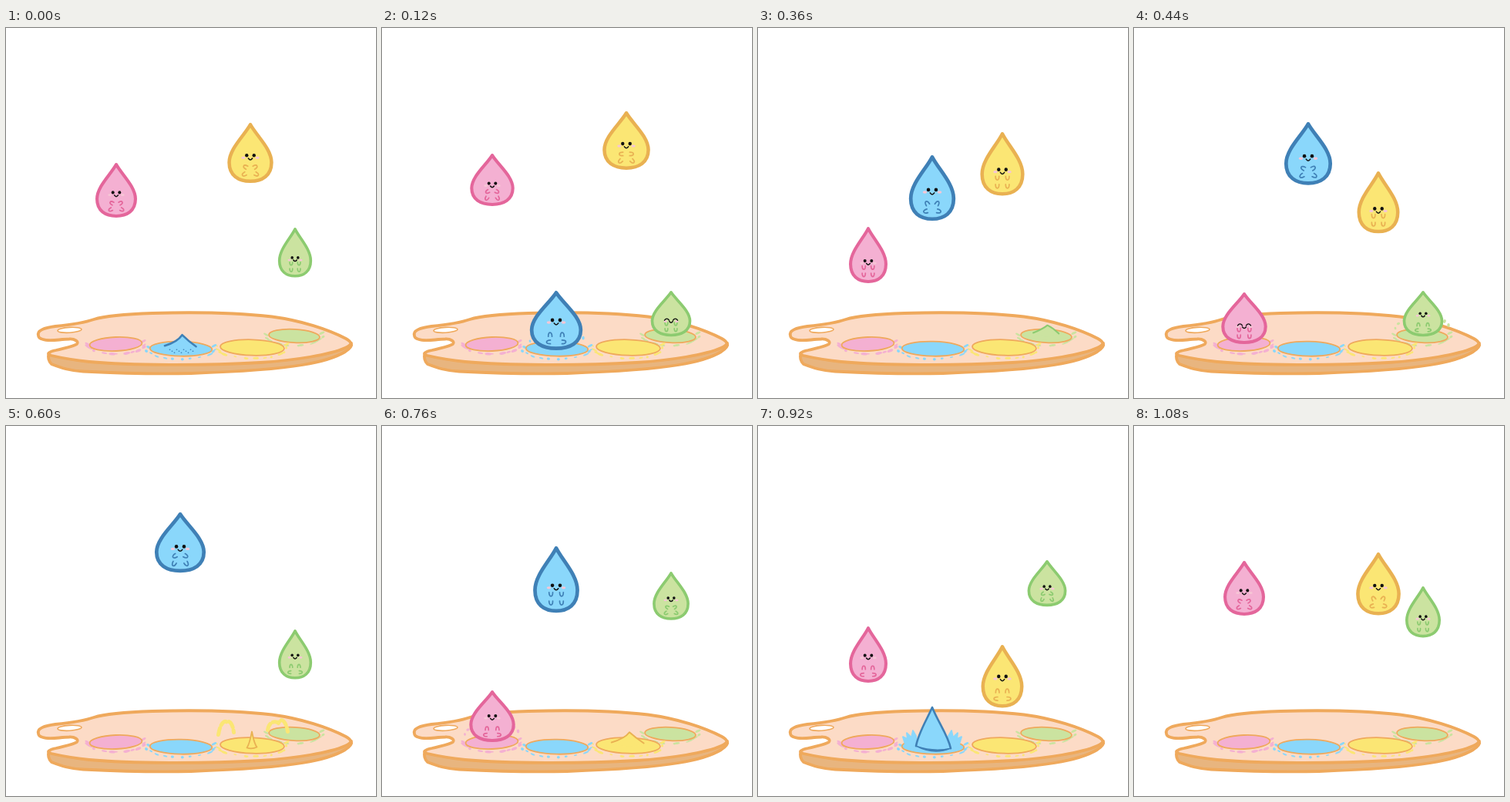
These frames come from a looping animation (480x480 px, 1.12 s). An HTML page with a canvas:

```html
<!DOCTYPE html>
<html lang="en">
<head>
<meta charset="utf-8">
<title>Paint drops</title>
<style>
  html, body { margin: 0; width: 100%; height: 100%; overflow: hidden; background: #fff; }
  canvas { display: block; width: 480px; height: 480px; }
</style>
</head>
<body>
<canvas id="stage" width="480" height="480"></canvas>
<script>
const ctx = document.getElementById('stage').getContext('2d');
const TICK = 40, TICKS = 28;
const EDGE = '#efa95c', TAU = Math.PI * 2;

// Drop size for poses 1 to 11 of the jump, before scaling
const HEIGHT = [67, 74, 73, 74, 71, 69, 68, 70, 75, 73, 67];
const WIDTH = [59.5, 50, 50, 52.5, 54, 56, 57.5, 55, 52, 50, 59.5];

// tips: y of the point in poses 1 to 11; pool: centre, radii, tilt
const drops = [
  { fill: '#cbe3a0', line: '#8ccb70', x: 375, scale: .885, start: 8, spray: 4,
    pool: [374, 399.5, 33, 8.7, .05],
    tips: [341, 305, 264, 222, 189, 177, 174, 183, 208, 259, 341] },
  { fill: '#fbe674', line: '#e9b152', x: 317, scale: 1.1, start: 18, spray: 4, sinks: true,
    pool: [319.5, 414.5, 41.5, 10.2, .03],
    tips: [341, 284, 222, 164, 123, 108, 103, 102, 135, 186, 364] },
  { fill: '#8ad7fb', line: '#3f80b6', x: 226, scale: 1.15, start: 0, spray: 0, sinks: true, dots: true,
    pool: [227, 416.2, 40.3, 9.5, .02],
    tips: [341, 290, 229, 165, 122, 112, 112, 120, 156, 225, 364] },
  { fill: '#f4b0d2', line: '#e4669b', x: 143, scale: 1, start: 17, spray: 0,
    pool: [142.5, 410, 34, 9, -.04],
    tips: [343, 305, 260, 212, 175, 165, 163, 169, 200, 258, 343] }
];

function paint(path, fill, line, width) {
  if (fill) { ctx.fillStyle = fill; ctx.fill(path); }
  if (line) { ctx.strokeStyle = line; ctx.lineWidth = width; ctx.stroke(path); }
}

function oval(x, y, rx, ry, tilt = 0) {
  const p = new Path2D();
  p.ellipse(x, y, rx, ry, tilt, 0, TAU);
  return p;
}

function random(seed) {
  return () => (seed = (seed * 16807) % 2147483647) / 2147483647;
}

const rim = new Path2D(`M55.5 422 C54 428 56 433 59 436 C72 441 82 444.5 100 445.5
  C150 448 200 449 240 448 C300 446 350 443 385 437 C415 432 430 426 440 420 C446 416 449 412 448 409 Z`);
const board = new Path2D(`M42 399 C40 392 50 389 64 387 C84 385 100 383 114 378
  C130 373 160 371 190 370 C240 368.5 300 369.5 345 374.5 C383 379.5 418 391 441 403
  C450 408 449 411 440 415 C420 424 375 431 330 434 C260 438 160 438 108 433
  C90 431 72 428 59 425 C52 423 55 420 65 418 C76 415 88 413 92 410
  C95 407 89 403 82 403.5 C68 404 56 407 48 404 C44 403 42 401 42 399 Z`);

function drawBoard() {
  paint(rim, '#e8b57f', EDGE, 3.8);
  paint(board, '#fcdbc6', EDGE, 3.8);
  paint(oval(82.5, 391.8, 15.5, 3.4, -.06), '#fff', EDGE, 1.6);
}

function drawPool(d, n) {
  const [x, y, rx, ry, tilt] = d.pool;
  const rnd = random(91 + n * 37);
  ctx.fillStyle = d.fill;
  for (let i = 0; i < 13; i++) {
    const a = -.3 + i / 13 * 3.7 + rnd() * .2;
    const far = 1.06 + rnd() * .08;
    ctx.fill(oval(x + Math.cos(a) * rx * far, y + Math.sin(a) * (ry + 2.5) * far,
      1.4 + rnd() * 3.2, .8 + rnd() * 1, -Math.cos(a) * .5));
  }
  paint(oval(x, y, rx, ry, tilt), d.fill, EDGE, 1.8);
}

function teardrop(w, h) {
  const a = w / 2;
  return new Path2D(`M0 0 C${a * .3} ${h * .2} ${a} ${h * .43} ${a} ${h * .67}
    C${a} ${h * .9} ${a * .56} ${h} 0 ${h} C${-a * .56} ${h} ${-a} ${h * .9} ${-a} ${h * .67}
    C${-a} ${h * .43} ${-a * .3} ${h * .2} 0 0 Z`);
}

// A small open curl, used for hands and feet
function curl(x, y, angle, size) {
  ctx.save();
  ctx.translate(x, y);
  ctx.rotate(angle * Math.PI / 180);
  ctx.stroke(new Path2D(`M${-size} ${-size * 1.2} C${-size} ${size * 1.6} ${size} ${size * 1.6} ${size} ${-size * 1.2}`));
  ctx.restore();
}

function drawFace(d, pose, h) {
  const s = d.scale, y = h * (.45 + .0125 * pose), gap = 4.3 * s;
  const asleep = pose === 11;
  for (const side of [-1, 1]) {
    paint(oval(side * 8.3 * s, y + 3, 2.4 * s, 1.5 * s), '#f6c6d6');
    if (asleep) {
      paint(new Path2D(`M${side * 5.5 - 3} ${y + 1.5} q3 -4 6 0`), null, '#111', 1.4);
    } else {
      paint(oval(side * gap, y, 2 * s, 2.1 * s), '#111');
    }
  }
  paint(new Path2D(`M${-2.4 * s} ${y + 3.4 * s} q${2.4 * s} ${3.6 * s} ${4.8 * s} 0`), null, '#111', 1.5);
}

function drawLimbs(d, pose, w, h) {
  const turn = Math.min(1, Math.max(0, (9 - pose) / 6)), lean = .115 * w;
  ctx.strokeStyle = d.line;
  ctx.lineWidth = 1.7;
  for (const side of [-1, 1]) {
    curl(side * lean, h * .7, -side * 180 * turn, 2.1 * d.scale);
    curl(side * (lean + 2.5 * turn), h * .83, -side * 90 * turn, 2.1 * d.scale);
  }
}

function drawDrop(d, pose) {
  const h = HEIGHT[pose - 1] * d.scale, w = WIDTH[pose - 1] * d.scale;
  const line = 4.1 * d.scale;
  ctx.save();
  ctx.translate(d.x, d.tips[pose - 1] + line / 2);
  paint(teardrop(w - line, h - line), d.fill, d.line, line);
  drawLimbs(d, pose, w, h);
  drawFace(d, pose, h);
  ctx.restore();
}

function drawBits(d, bits) {
  const [x, y] = d.pool;
  for (const [dx, dy, r] of bits) paint(oval(x + dx, y + dy, r, r * .75, dx * dy), d.fill);
}

function drawMound(d) {
  const [x, y, rx] = d.pool;
  const a = rx * .56, top = -18 * d.scale / 1.15;
  ctx.save();
  ctx.translate(x + 1.5, y);
  paint(new Path2D(`M${-a} -4 Q-6 -10 0 ${top} Q8 -9 ${a * .8} -3 Q0 6 ${-a} -4 Z`), d.fill);
  paint(new Path2D(`M${-a} -4 Q-6 -9 0 ${top} Q8 -10 ${a * .8} -3`), null, d.line, d.dots ? 2.6 : 2);
  if (d.dots) {
    for (let i = 0; i < 11; i++) {
      paint(oval(-16 + i * 3, 1 + (i % 3) * 2, .9, .7), d.line);
    }
  }
  ctx.restore();
}

function drawSinking(d) {
  const y = d.pool[1], top = d.tips[10] - y + 1;
  ctx.save();
  ctx.translate(d.x, y);
  for (const side of [-1, 1]) {
    const crown = new Path2D(`M${side * 19} 2 L${side * 21} -14 L${side * 25} -21 L${side * 27} -12
      L${side * 33} -18 L${side * 32} -10 L${side * 38} -13 L${side * 34} 0 Z`);
    paint(crown, d.fill, d.fill, 2);
  }
  const sides = `M-21 -1 C-18 -18 -7 ${top + 16} 0 ${top} C8 ${top + 20} 20 -16 24 2`;
  paint(new Path2D(`${sides} Q2 11 -21 -1 Z`), d.fill);
  paint(new Path2D(sides), null, d.line, 2.6);
  paint(new Path2D('M-21 -1 Q2 11 24 2 Q2 7 -21 -1 Z'), d.line, d.line, 1.4);
  ctx.restore();
}

function drawSpike(d) {
  const [x, y] = d.pool, s = d.scale / 1.1;
  ctx.save();
  ctx.translate(x, y);
  ctx.scale(s, s);
  paint(new Path2D('M-7 3 C-3 -3 -2 -12 -.5 -18 C1 -12 2 -3 6 2 Q0 5 -7 3 Z'), d.fill, d.line, 1.8);
  ctx.setLineDash([9, 4]);
  paint(new Path2D('M-44 -14 C-42 -28 -36 -34 -33 -30 C-29 -34 -25 -26 -24 -17'), null, d.fill, 5);
  paint(new Path2D('M20 -20 C22 -32 30 -32 34 -29 C38 -38 44 -30 46 -18'), null, d.fill, 5);
  ctx.restore();
}

const SIDE_BITS = [[-31, -16, 2.2], [29, -19, 2.4], [34, -14, 2.4], [-35, -10, 1.8]];
const HIGH_BITS = [[-22, -23, 3.2], [19, -26, 2.8], [36, -18, 3.4], [-36, -14, 3.4]];

function drawPose(d, pose) {
  if (pose === 0) drawMound(d);
  else if (pose === 11 && d.sinks) drawSinking(d);
  else if (pose === 12) drawSpike(d);
  else if (pose === 13) drawBits(d, HIGH_BITS.slice(0, d.spray));
  else {
    if (pose === 1) drawBits(d, SIDE_BITS);
    drawDrop(d, pose);
  }
}

const began = performance.now();

function frame(now) {
  const tick = Math.floor(Math.max(0, now - began) / TICK) % TICKS;
  ctx.fillStyle = '#fff';
  ctx.fillRect(0, 0, 480, 480);
  ctx.lineJoin = ctx.lineCap = 'round';
  drawBoard();
  drops.forEach(drawPool);
  // Each drop holds a pose for two ticks, on its own offset
  for (const d of drops) drawPose(d, Math.floor((tick - d.start + TICKS) % TICKS / 2));
  requestAnimationFrame(frame);
}
frame(began);
</script>
</body>
</html>
```
